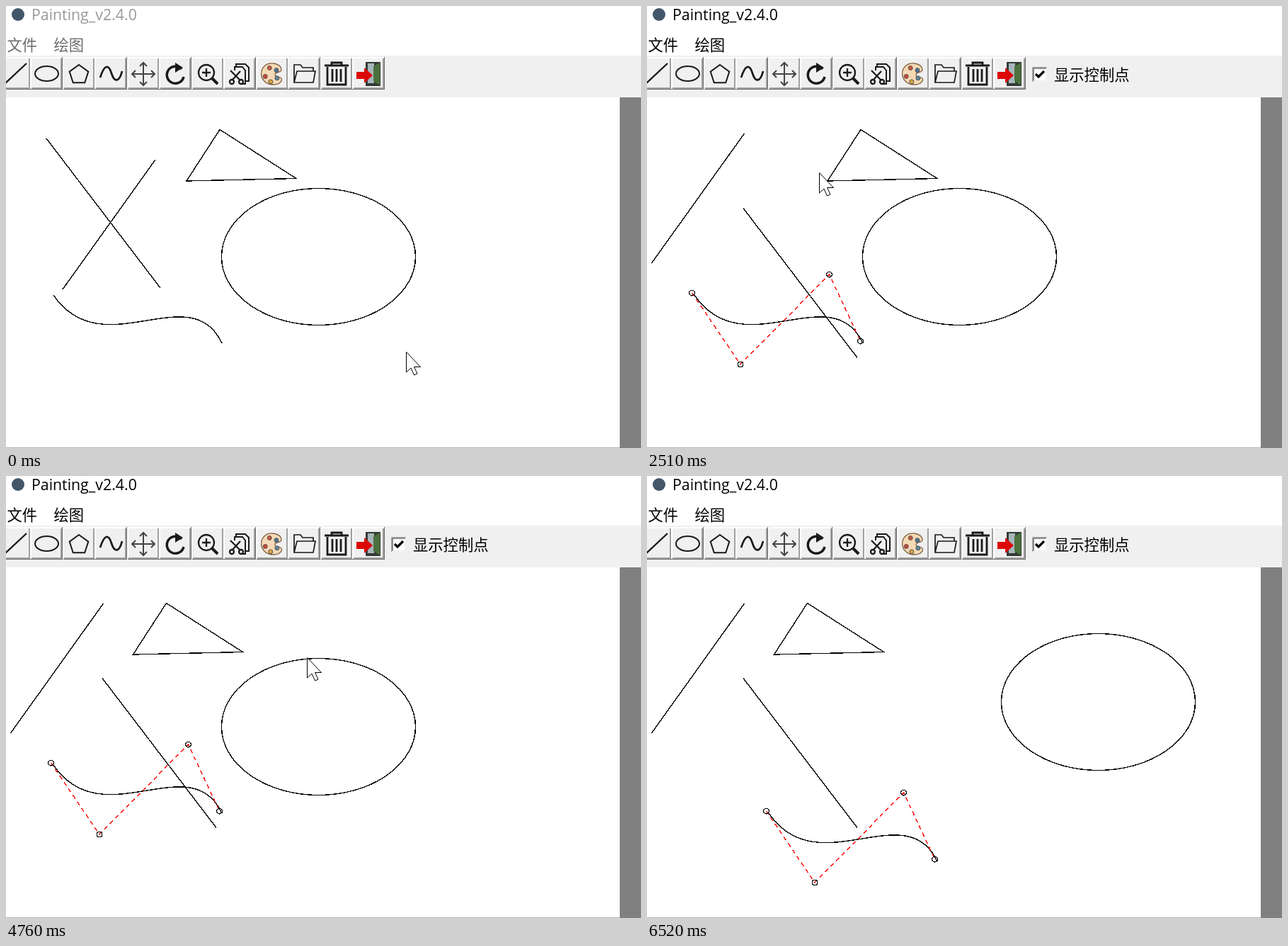
Recreate the animation shown at these times as an HTML page. Size 897 by 624 pixels, loop 6890 ms.

```html
<!DOCTYPE html>
<html lang="zh">
<head>
<meta charset="utf-8">
<title>Painting_v2.4.0</title>
<style>
  html, body { margin: 0; width: 100%; height: 100%; overflow: hidden; background: #fff; }
  svg { display: block; }
  text { font: 21.3px "Noto Sans CJK SC", "Noto Sans CJK JP", "Noto Sans CJK", sans-serif; }
  .title { font-family: "Open Sans", "Noto Sans", sans-serif; }
  .draw { fill: none; stroke: #000; stroke-width: 1.4; shape-rendering: crispEdges; }
  .icons { fill: none; stroke: #1a1a1a; stroke-width: 2.3; }
  .solid { stroke: none; }
</style>
</head>
<body>
<svg width="897" height="624">
  <defs>
    <g id="button" fill="none" stroke-width="2" shape-rendering="crispEdges">
      <path d="M0 117V73H45" stroke="#fff"/>
      <path d="M1 116H43V74" stroke="#a0a0a0"/>
      <path d="M0 117.5H44.5V72" stroke="#696969" stroke-width="1"/>
    </g>
    <path id="arm" d="M0 0V-16M-5 -11L0 -16L5 -11"/>
  </defs>
  <rect y="70" width="897" height="59" fill="#f0f0f0"/>
  <rect x="867" y="129" width="30" height="495" fill="#808080"/>
  <rect y="623" width="867" height="1" fill="#b4b4b4"/>
  <circle cx="17" cy="12" r="9" fill="#43566a"/>
  <text id="title" class="title" x="36" y="20">Painting_v2.4.0</text>
  <g id="menu"><text x="1.5" y="63">文件</text><text x="67.5" y="63">绘图</text></g>

  <g id="buttons"></g>
  <g class="icons">
    <path d="M-2 110L29 81"/>
    <ellipse cx="57.5" cy="95.5" rx="16.5" ry="10.5" stroke-width="2"/>
    <path id="pentagon" stroke-width="2"/>
    <path d="M133 101C139 82 145 82 149 95S160 108 164 92" stroke-width="2.8"/>
    <g id="arrows" transform="translate(194 96)" stroke="#444" stroke-width="2"></g>
    <path d="M248 89A12 12 0 1 0 251 100" stroke-width="3.5"/>
    <path class="solid" d="M239 80L250 87L239 94Z" fill="#1a1a1a"/>
    <circle cx="283" cy="94" r="11"/>
    <path d="M277 94h12m-6 -6v12"/>
    <path d="M291 102l8 8" stroke-width="4"/>
    <path d="M325 86V82H338L343 87V106H337M323 91V86H334L338 91V110H333" stroke-width="2"/>
    <path d="M317 91l14 14m0 -13l-11 12"/>
    <circle cx="319" cy="107" r="3"/><circle cx="332" cy="107" r="3"/>
    <path d="M377 81C355 80 355 111 378 111C386 111 391 106 389 102C387 99 380 102 380 97S389 95 389 90S383 81 377 81Z" fill="#f5d9b5" stroke="#806448" stroke-width="1.3"/>
    <g id="paints" stroke="#555" stroke-width="1"></g>
    <path d="M407 108V83H416L419 87H434V92M407 108L411 92H437L434 108Z" stroke-width="1.7"/>
    <path d="M450 84h34M460 83v-3h14v3M454 86v25h26v-25M461 89v18m6 0v-18m6 0v18" stroke-width="2.8"/>
    <g class="solid">
      <rect x="508" y="79" width="21" height="34" fill="#343a35"/>
      <rect x="511" y="81" width="9" height="28" fill="#a6b6ba"/>
      <path d="M519 85L528 80V112L519 106Z" fill="#4c713d"/>
      <path d="M495 93h11v-6l12 11l-12 11v-6h-11Z" fill="#dc0808"/>
    </g>
  </g>

  <g id="check" fill="none">
    <rect x="544" y="86" width="21" height="21" fill="#fff"/>
    <path d="M544.5 107V86.5H565" stroke="#a0a0a0"/>
    <path d="M546 106V88H564" stroke="#696969" stroke-width="1.5"/>
    <path d="M546 106H564V88" stroke="#e3e3e3"/>
    <path d="M549 96l4 4l8 -8" stroke="#000" stroke-width="3.2"/>
    <text x="575" y="104.5" fill="#000">显示控制点</text>
  </g>

  <g class="draw">
    <path class="shape" d="M57 187L218 398"/>
    <path class="shape" d="M211 217L80 400"/>
    <path class="shape" d="M302 174.5L255 247L410 243.5Z"/>
    <ellipse class="shape" cx="441.5" cy="354" rx="137" ry="96.5"/>
    <g class="shape">
      <path d="M67 408C136 509 261 382 305 476"/>
      <g id="handles"></g>
    </g>
  </g>

  <circle id="halo" r="21" fill="#ff0" fill-opacity=".5"/>
  <path id="cursor" d="M.5 .5V29L7 23L11.5 33L16 31L11.5 21.5H20.5Z" fill="#fff" stroke="#000"/>
</svg>
<script>
const LOOP = 6890, BEAT = 125.2, FOCUS = 650;
const $ = id => document.getElementById(id);
const shapes = document.querySelectorAll('.shape');

// cursor moves: arrival beat, beats taken, x, y, dragged shape
const moves = [
  [0, 0, 565, 488], [4, 4, 189, 84], [6, 1, 161, 212], [7, 1, 133, 257], [9, 1, 117, 261],
  [11, 1, 120, 265, 0], [14, 3, 196, 359.5, 0], [16, 2, 172, 272],
  [18, 1, 92, 242, 1], [19, 1, 98.5, 235, 1], [20, 1, 243, 235], [21, 1, 281, 238],
  [24, 3, 178, 211], [27, 3, 297, 250], [28, 1, 298, 239],
  [30, 1, 294, 243, 2], [32, 2, 222.5, 244, 2], [34, 2, 409, 278], [38, 3, 425, 256],
  [42, 3, 621, 221, 3], [45, 3, 188.5, 448],
  [47, 1, 194, 448, 4], [50, 3, 293.5, 516, 4], [51, 1, 743, 600], [52, 1, 743, 700]
];

const add = (id, html) => $(id).innerHTML += html;
for (let i = 0; i < 12; i++) add('buttons', `<use href="#button" x="${Math.round(45.5 * i - 10.5)}"/>`);
for (let i = 0; i < 4; i++) add('arrows', `<use href="#arm" transform="rotate(${90 * i})"/>`);
const corners = [0, 1, 2, 3, 4].map(i => {
  const a = i * Math.PI * .4;
  return [103 + 14 * Math.sin(a), 97 - 14 * Math.cos(a)];
});
$('pentagon').setAttribute('d', `M${corners.join('L')}Z`);
['#4d7594', '#c9563b', '#cc463c', '#dda23b', '#5f859b'].forEach((color, i) => {
  const a = 5.6 - i * 1.2 - (i > 1 ? .3 : 0);
  add('paints', `<circle cx="${375 + 9 * Math.cos(a)}" cy="${97 + 10 * Math.sin(a)}" r="3" fill="${color}"/>`);
});
const knots = [[63.5, 405], [132, 506], [257.5, 379], [301.5, 473]];
add('handles', `<path d="M${knots.join('L')}" stroke="#f00" stroke-dasharray="6 5"/>`);
for (const [x, y] of knots) add('handles', `<circle cx="${x}" cy="${y}" r="3.8"/>`);

const place = (el, x, y) => el.setAttribute('transform', `translate(${x} ${y})`);
const show = (el, on) => el.setAttribute('visibility', on ? 'visible' : 'hidden');

function draw(t) {
  const beat = Math.floor(t / BEAT);
  const offsets = Array.from(shapes, () => [0, 0]);
  let [, , x, y] = moves[0], dragged;
  for (const [end, steps, toX, toY, shape] of moves.slice(1)) {
    if (beat <= end - steps) break;
    const k = Math.min(1, (beat - end + steps) / steps);
    const dx = (toX - x) * k, dy = (toY - y) * k;
    x += dx;
    y += dy;
    dragged = beat <= end ? shape : undefined;
    if (shape !== undefined) {
      offsets[shape][0] += dx;
      offsets[shape][1] += dy;
    }
  }
  offsets.forEach(([ox, oy], i) => place(shapes[i], ox, oy));
  place($('cursor'), x, y);
  place($('halo'), x, y);
  show($('halo'), dragged !== undefined);

  const focused = t >= FOCUS;
  show($('check'), focused);
  show($('handles'), focused);
  $('title').setAttribute('fill', focused ? '#000' : '#999');
  $('menu').setAttribute('fill', focused ? '#000' : '#6d6d6d');
}

const start = performance.now();
function tick() {
  draw((performance.now() - start) % LOOP);
  requestAnimationFrame(tick);
}
tick();
</script>
</body>
</html>
```
